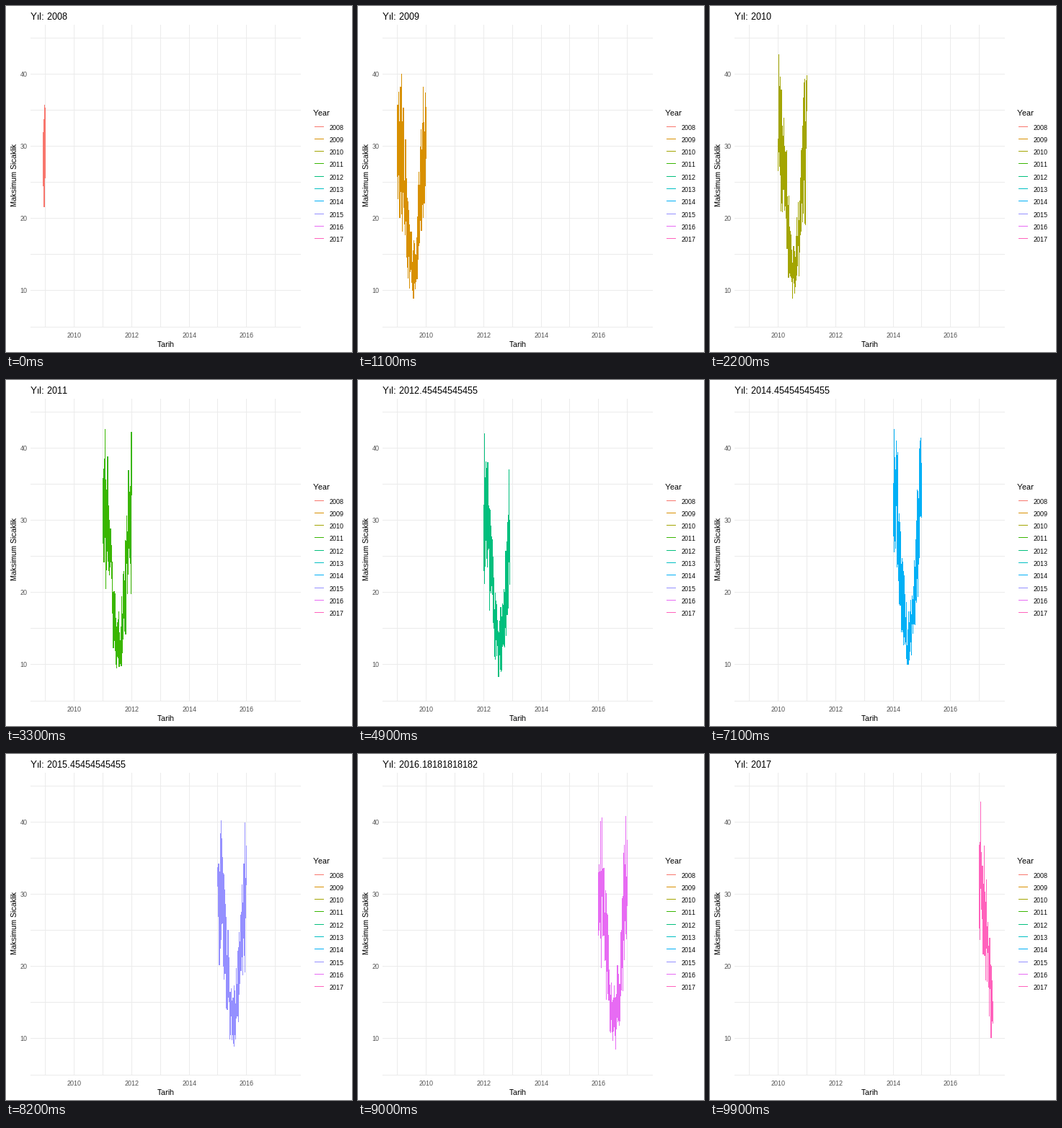
A matplotlib script that plays this animation: 480 by 480 pixels, repeating every 10000 ms.

```python
import matplotlib.pyplot as plt
import numpy as np
from matplotlib.animation import FuncAnimation

SIZE = 480
PX = 0.72  # points per pixel at 100 dpi
STEPS = 11  # animation steps per year
YEARS = range(2008, 2018)
COLORS = ["#F8766D", "#D89000", "#A3A500", "#39B600", "#00BF7D",
          "#00BFC4", "#00B0F6", "#9590FF", "#E76BF3", "#FF62BC"]
FIRST_DAY, LAST_DAY = "2008-12-01", "2017-06-26"
GAPS = ["2011-04", "2012-12", "2013-02"]  # months without readings


def x_px(days):
    """Centre of the pixel column for days since 2009-01-01."""
    return np.floor(54.9 + 39.83 * days / 365.25) + 0.5


def y_px(temp):
    """Centre of the pixel row for a temperature."""
    return np.floor(495.05 - 10.01 * temp) + 0.5


def weather(year):
    """Pixel path of one year: seasonal wave plus day-to-day noise."""
    rng = np.random.default_rng(year)
    start = max(f"{year}-01-01", FIRST_DAY)
    stop = min(f"{year + 1}-01-01", LAST_DAY)
    dates = np.arange(start, stop, dtype="datetime64[D]")
    days = (dates - np.datetime64("2009-01-01")).astype(int)

    season = np.cos(2 * np.pi * (days / 365.25 - 0.04))
    drift = 0.0
    noise = np.empty(len(days))
    for i, kick in enumerate(rng.normal(0, 0.85, len(days))):
        drift = 0.5 * drift + kick
        noise[i] = np.clip(drift, -2.2, 2.3)
    temp = 22 + 9.3 * season + (3.5 + 1.5 * season) * noise

    keep = ~np.isin(dates.astype("datetime64[M]").astype(str), GAPS)
    return x_px(days[keep]), y_px(temp[keep])


plt.rcParams.update({
    "font.family": "Liberation Sans",
    "text.hinting": "native",
    "text.hinting_factor": 1,
    "text.kerning_factor": 6,
    "path.simplify": False,
})

fig = plt.figure(figsize=(4.8, 4.8), dpi=100, facecolor="white")
ax = fig.add_axes([0, 0, 1, 1])
ax.set_xlim(0, SIZE)
ax.set_ylim(SIZE, 0)
ax.axis("off")


def stroke(xs, ys, color, z=1):
    line, = ax.plot(xs, ys, color=color, lw=PX, antialiased=False, zorder=z,
                    solid_capstyle="butt", solid_joinstyle="bevel")
    line.set_snap(False)
    return line


def label(x, y, text, size, color="black", **kw):
    return ax.text(x, y, text, fontsize=size * PX, color=color, **kw)


# Grid and axis labels
for k in range(9):
    x = x_px(k * 365.25)
    stroke([x, x], [26, 446], "#EBEBEB")
    if k % 2:
        label(x, 460, str(2009 + k), 9, "#4D4D4D", ha="center")
for temp in range(5, 50, 5):
    y = y_px(temp)
    stroke([34, 409], [y, y], "#EBEBEB")
    if temp % 10 == 0:
        label(29.5, y + 4, str(temp), 9, "#4D4D4D", ha="right")

label(222, 473, "Tarih", 11, ha="center")
label(15, 235, "Maksimum Sicaklik", 11, rotation=90, rotation_mode="anchor",
      ha="center", va="baseline")

# Legend
label(426, 152, "Year", 11)
for i, (year, color) in enumerate(zip(YEARS, COLORS)):
    y = round(167.6 + 17.28 * i)
    stroke([428, 441], [y - 0.5, y - 0.5], color)
    label(449, y + 4, str(year), 9)

title = label(34, 19, "", 13)
paths = [weather(year) for year in YEARS]
series = stroke([], [], COLORS[0], z=3)


def update(step):
    i = step // STEPS
    title.set_text(f"Yıl: {2008 + step / STEPS:.15g}")
    series.set_data(*paths[i])
    series.set_color(COLORS[i])
    return title, series


anim = FuncAnimation(fig, update, frames=STEPS * 9 + 1, interval=100,
                     repeat=True, repeat_delay=0)
plt.show()
```
